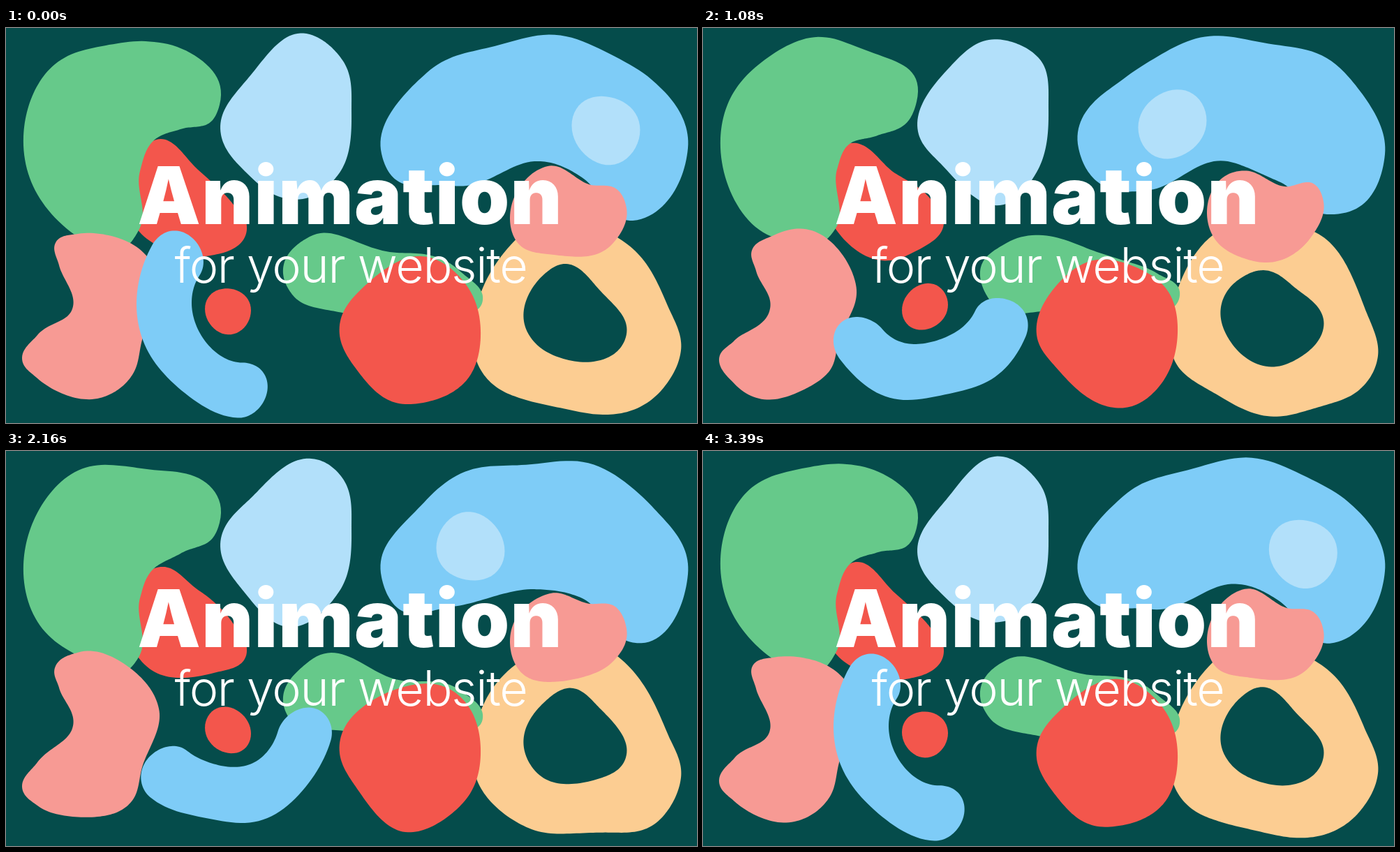
Write an HTML page with a canvas that moves like this. It is 990 by 566 pixels and loops after 3420 ms.

```html
<!DOCTYPE html>
<html lang="en">
<head>
<meta charset="utf-8">
<title>Animation for your website</title>
<style>
  html, body { margin: 0; width: 100%; height: 100%; overflow: hidden; background: #054c4b; }
  canvas { display: block; }
</style>
</head>
<body>
<canvas id="stage" width="990" height="566"></canvas>
<script>
const ctx = document.getElementById('stage').getContext('2d');
const LOOP = 3420, HALF = LOOP / 2, RAD = Math.PI / 180;
const TEAL = '#054c4b', GREEN = '#66c98a', RED = '#f3564c', SKY = '#b2e0fa',
      BLUE = '#7eccf7', PINK = '#f79a94', SAND = '#fccd92';

// Vertical ripple that travels to the right, two periods per loop.
const wave = (x, t) => 5 * Math.cos(2 * Math.PI * t / HALF - (1.95 * x - 275) * RAD);

const bezier = (u, a, b, c, d) =>
  a * (1 - u) ** 3 + 3 * b * u * (1 - u) ** 2 + 3 * c * u * u * (1 - u) + d * u ** 3;

// Closed smooth outline: each key point takes the tangent of the circle through
// itself and its neighbours. Key points are given at t = 0, so undo the ripple first.
function blob(...keys) {
  const n = keys.length, points = keys.map(([x, y]) => [x, y - wave(x, 0)]);
  const nodes = points.map(([x, y], i) => {
    const [px, py] = points[(i + n - 1) % n], [qx, qy] = points[(i + 1) % n];
    const before = Math.hypot(x - px, y - py), after = Math.hypot(qx - x, qy - y);
    const tx = (x - px) / before ** 2 + (qx - x) / after ** 2;
    const ty = (y - py) / before ** 2 + (qy - y) / after ** 2;
    const size = Math.hypot(tx, ty);
    return { x, y, tx: tx / size, ty: ty / size };
  });
  return nodes.flatMap((a, i) => {
    const b = nodes[(i + 1) % n], dx = b.x - a.x, dy = b.y - a.y, d = Math.hypot(dx, dy);
    const handle = p => 2 * d / (3 + 3 * (p.tx * dx + p.ty * dy) / d);
    const ha = handle(a), hb = handle(b);
    return Array.from({ length: 24 }, (_, k) => [
      bezier(k / 24, a.x, a.x + ha * a.tx, b.x - hb * b.tx, b.x),
      bezier(k / 24, a.y, a.y + ha * a.ty, b.y - hb * b.ty, b.y)
    ]);
  });
}

function arc(cx, cy, r, from, to) {
  return Array.from({ length: 49 }, (_, i) => {
    const a = (from + (to - from) * i / 48) * RAD;
    return [cx + r * Math.cos(a), cy + r * Math.sin(a)];
  });
}
const disc = (x, y, r) => arc(x, y, r, 0, 360);

// Thick arc with round ends, in coordinates around its pivot.
function makeBanana() {
  const cx = 5, cy = -30, r = 119, w = 39.5, a = 32, b = 148;
  const cap = (end, from) => arc(cx + r * Math.cos(end * RAD), cy + r * Math.sin(end * RAD), w, from, from + 180);
  return [...arc(cx, cy, r + w, a, b), ...cap(b, b), ...arc(cx, cy, r - w, b, a), ...cap(a, a + 180)];
}

const banana = makeBanana();
const redLeaf = blob([208, 163], [275, 203], [325, 252], [345, 284], [293, 326], [192, 293], [180, 200]);
const greenHook = blob([25, 155], [70, 52], [200, 19], [306, 110], [295, 133], [250, 145],
  [208, 165], [192, 205], [190, 290], [172, 314], [98, 296]);
const drop = blob([435, 9], [482, 46], [495, 120], [476, 210], [430, 244], [340, 203], [308, 153], [351, 67]);
const bigBlue = blob([538, 180], [603, 64], [745, 14], [925, 74], [977, 172], [898, 276],
  [825, 214], [757, 191], [640, 226], [558, 217]);
const pinkCap = blob([776, 198], [835, 224], [875, 231], [889, 258], [870, 308], [785, 325], [735, 310], [722, 272]);
const ring = blob([820, 272], [882, 304], [948, 398], [967, 462], [940, 518], [855, 554],
  [745, 533], [677, 484], [674, 400]);
const hole = blob([800, 338], [850, 375], [888, 443], [842, 478], [756, 449], [742, 420], [772, 352]);
const greenBar = blob([435, 299], [560, 322], [650, 348], [683, 390], [640, 412], [490, 410], [411, 383], [397, 345]);
const bigRed = blob([590, 327], [660, 369], [680, 442], [655, 510], [580, 539], [505, 493], [478, 440], [520, 364]);
const pinkBone = blob([103, 295], [200, 325], [219, 362], [195, 447], [181, 497], [135, 530],
  [45, 502], [23, 473], [45, 440], [96, 399], [76, 340], [70, 310]);

// cubic-bezier(.45, 0, .55, 1), inverted with Newton steps.
function ease(x) {
  const a = 0.45;
  let u = x;
  for (let i = 0; i < 6; i++) {
    u -= (bezier(u, 0, a, 1 - a, 1) - x) / (3 * a + (6 - 18 * a) * u + (18 * a - 6) * u * u);
  }
  return u * u * (3 - 2 * u);
}

// Eased 0 to 1 and back, once per loop.
function swing(t) {
  const s = t % LOOP / HALF;
  return ease(s < 1 ? s : 2 - s);
}

function fill(points, color, t) {
  ctx.beginPath();
  for (const [x, y] of points) ctx.lineTo(x, y + wave(x, t));
  ctx.fillStyle = color;
  ctx.fill();
}

function label(text, x, y, font, spacing) {
  ctx.font = font;
  ctx.letterSpacing = spacing;
  ctx.fillText(text, x, y);
}

function draw(t) {
  ctx.fillStyle = TEAL;
  ctx.fillRect(0, 0, 990, 566);

  fill(redLeaf, RED, t);
  fill(greenHook, GREEN, t);
  fill(drop, SKY, t);
  fill(bigBlue, BLUE, t);
  const p = swing(t + 70), u = p * (1.25 - 0.25 * p);
  fill(disc(bezier(u, 860, 810, 720, 624), bezier(u, 144, 80, 115, 159), 49), SKY, t);
  fill(ring, SAND, t);
  fill(hole, TEAL, t);
  fill(pinkCap, PINK, t);
  fill(greenBar, GREEN, t);
  fill(bigRed, RED, t);
  fill(pinkBone, PINK, t);
  fill(disc(318, 401.5, 33), RED, t);

  const angle = (63 - 93.5 * swing(t + 40)) * RAD, c = Math.cos(angle), s = Math.sin(angle);
  fill(banana.map(([x, y]) => [316.5 + x * c - y * s, 405 + x * s + y * c]), BLUE, t);

  ctx.fillStyle = '#fff';
  ctx.textAlign = 'center';
  label('Animation', 493, 280.5, '900 114px Inter, Arial, sans-serif', '1.2px');
  label('for your website', 494, 364.5, '300 70px Inter, Arial, sans-serif', '-1.3px');
}

function tick() {
  draw(performance.now() % LOOP);
  requestAnimationFrame(tick);
}
tick();
</script>
</body>
</html>
```
